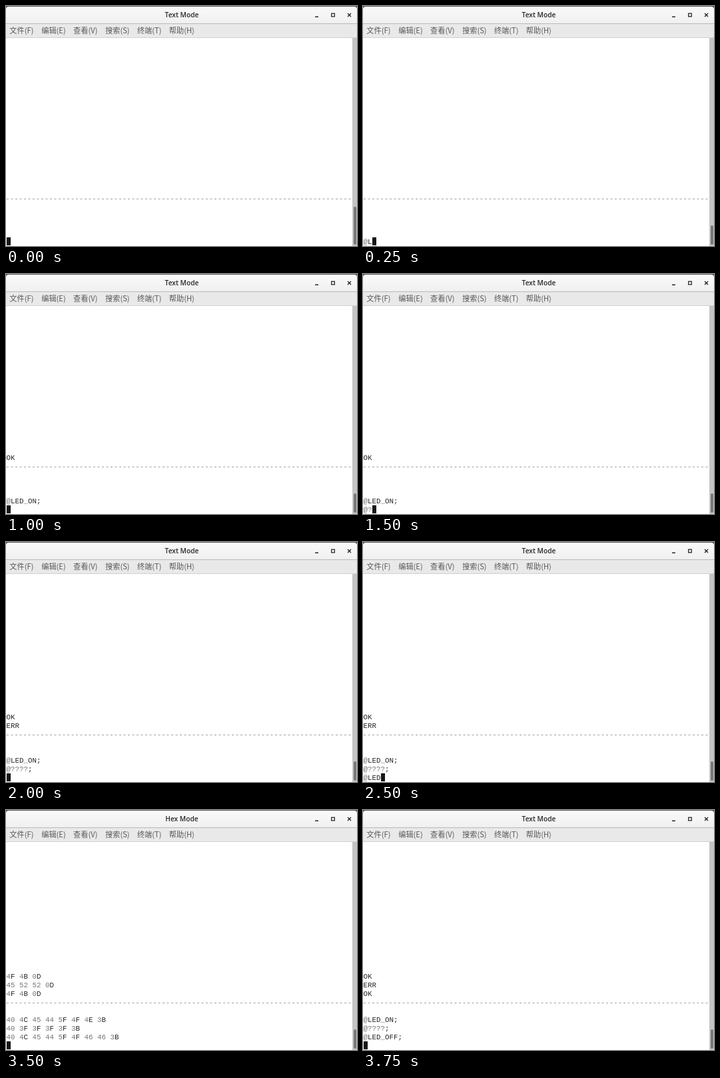
Animation of 527x360 px, one loop 4000 ms. Source, as an HTML page with a canvas:

```html
<!DOCTYPE html>
<html lang="zh">
<head>
<meta charset="utf-8">
<title>Terminal</title>
<style>
html, body { margin: 0; width: 100%; height: 100%; overflow: hidden; background: #fff; }
canvas { display: block; }
</style>
</head>
<body>
<canvas id="stage" width="527" height="360"></canvas>
<script>
const ctx = document.getElementById('stage').getContext('2d');
const W = 527, H = 360, STEP = 250, STEPS = 16;
const CELL = 6.5, ROW = 13, PROMPT_Y = 357, REPLY_Y = 279;

const commands = ['@LED_ON;', '@????;', '@LED_OFF;'];
const replies = ['OK', 'ERR', 'OK'];
const menus = ['文件(F)', '编辑(E)', '查看(V)', '搜索(S)', '终端(T)', '帮助(H)'];

// Characters typed after each step; commands are sent at the listed steps.
const typed = [0, 2, 5, 7, 0, 1, 2, 5, 0, 2, 4, 7, 9, 0, 0, 0];
const sentAt = [4, 8, 13];
const HEX_STEP = 14;

function rect(x, y, w, h, color) {
  ctx.fillStyle = color;
  ctx.fillRect(x, y, w, h);
}

function line(color, width, ...points) {
  ctx.strokeStyle = color;
  ctx.lineWidth = width;
  ctx.beginPath();
  points.forEach(([x, y], i) => i ? ctx.lineTo(x, y) : ctx.moveTo(x, y));
  ctx.stroke();
}

function toHex(text) {
  return [...text]
    .map(c => c.charCodeAt(0).toString(16).toUpperCase().padStart(2, '0'))
    .join(' ');
}

function mono(text, y) {
  ctx.font = '10.8px "Liberation Mono", monospace';
  ctx.textAlign = 'left';
  [...text].forEach((c, i) => {
    ctx.fillStyle = /[@?0-9_]/.test(c) ? '#777' : '#262626';
    ctx.fillText(c, i * CELL + 0.4, y);
  });
}

function drawChrome(title, thumbTop) {
  rect(0, 0, W, H, '#fff');

  rect(0, 0, W, 6, '#555');
  const bar = ctx.createLinearGradient(0, 0, 0, 26);
  bar.addColorStop(0, '#fafafa');
  bar.addColorStop(1, '#f0f0f0');
  ctx.fillStyle = bar;
  ctx.beginPath();
  ctx.roundRect(0, 1, W, 26, [4, 4, 0, 0]);
  ctx.fill();
  rect(0, 26, W, 1, '#b9b9b9');

  ctx.fillStyle = '#2a2a2a';
  ctx.textAlign = 'center';
  ctx.font = '600 10.2px "Open Sans", "Noto Sans", sans-serif';
  ctx.fillText(title, 264, 17);

  rect(464, 15.5, 5, 1.5, '#2a2a2a');
  ctx.strokeStyle = '#2a2a2a';
  ctx.lineWidth = 1.3;
  ctx.strokeRect(488.7, 11.2, 4.6, 4.6);
  line('#2a2a2a', 1.4, [513, 11], [518, 16]);
  line('#2a2a2a', 1.4, [518, 11], [513, 16]);

  rect(0, 27, W, 20, '#e9e9e9');
  rect(0, 47, W, 1, '#d2d2d2');
  ctx.fillStyle = '#585858';
  ctx.textAlign = 'left';
  ctx.font = '300 11.2px "Noto Sans CJK SC", "Noto Sans CJK", sans-serif';
  menus.forEach((m, i) => ctx.fillText(m, 5.3 + i * 47.9, 41));

  rect(520, 48, 7, H - 48, '#c4c4c4');
  ctx.fillStyle = '#747879';
  ctx.beginPath();
  ctx.roundRect(522, thumbTop, 4, 358 - thumbTop, 2);
  ctx.fill();
}

function drawTerminal(step) {
  const hex = step === HEX_STEP;
  const sent = sentAt.filter(s => step >= s).length;
  for (let i = 0; i < sent; i++) {
    const age = sent - i;
    mono(hex ? toHex(replies[i] + '\r') : replies[i], REPLY_Y - (age - 1) * ROW);
    mono(hex ? toHex(commands[i]) : commands[i], PROMPT_Y - age * ROW);
  }
  for (let i = 0; i < 80; i++) rect(i * CELL + 1, 289, 3, 1, '#a0a0a0');

  const count = typed[step];
  if (count) mono(commands[sent].slice(0, count), PROMPT_Y);
  rect(Math.round(count * CELL + 0.9), 347, 6, 12, '#161616');
}

function frame() {
  const step = Math.floor(performance.now() / STEP) % STEPS;
  drawChrome(step === HEX_STEP ? 'Hex Mode' : 'Text Mode', step ? 329 : 301);
  drawTerminal(step);
  requestAnimationFrame(frame);
}
frame();
</script>
</body>
</html>
```
